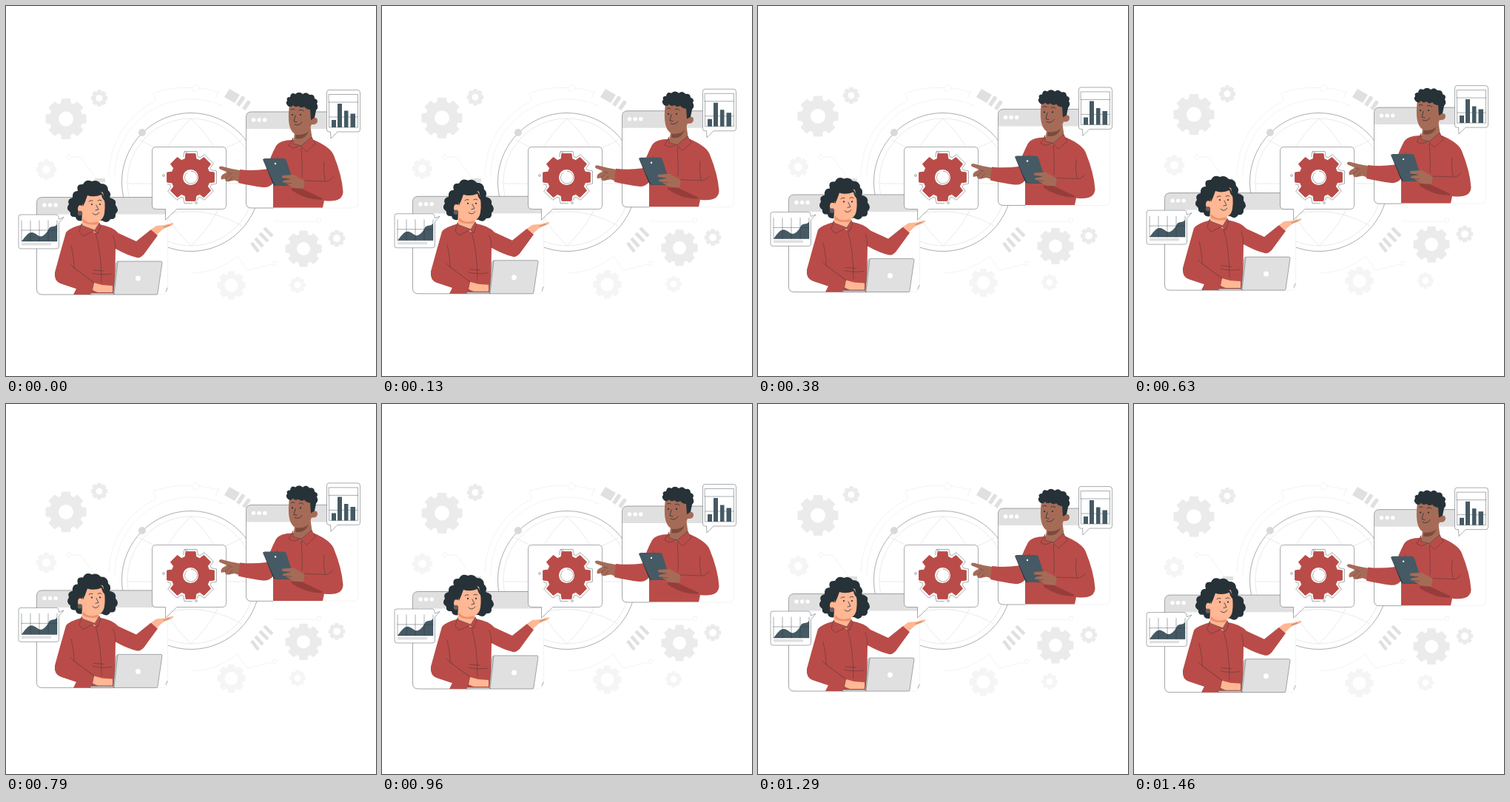
Write an HTML page that moves like this. It is 500 by 500 pixels and loops after 1.5 s.

```html
<!DOCTYPE html>
<html lang="en">
<head>
<meta charset="utf-8">
<title>Team presentation</title>
<style>
  html, body { margin: 0; width: 100%; height: 100%; overflow: hidden; background: #fff; }
  svg { display: block; width: 100vw; height: 100vh; }
  .dark { stroke: #263238; stroke-width: .4; }
  .faint { stroke: #ebebeb; stroke-width: .6; fill: none; }
  .line { fill: none; stroke: #263238; stroke-width: .4; stroke-linecap: round; stroke-linejoin: round; }
  .white { fill: #fff; }
  .gray { fill: #e0e0e0; }
  .ink { fill: #263238; }
  .slate { fill: #455a64; }
  .shirt { fill: #b94c48; }
  .fair { fill: #ffb794; }
  .brown { fill: #a66b57; }
  .face { stroke-width: .8; }
</style>
</head>
<body>
<svg viewBox="0 0 500 500">
  <g class="float" id="gears"></g>

  <g id="globe">
    <g class="faint">
      <path d="M139 228A112 112 0 0 1 203 128L199 118A128 128 0 0 1 251 110.500M260 111Q275 112 288 117M147 232A103 103 0 0 1 205 136Q250 116 293 135M252 361Q285 360 313 338L326 357L360 349M88 204H101L123 235M362 291H419M288 113L283 125"/>
      <circle cx="256" cy="111" r="4.500"/>
      <circle cx="84.500" cy="204" r="3"/>
      <circle cx="423" cy="290" r="3"/>
      <circle cx="363" cy="348" r="3"/>
      <path d="M164 240H336M181 181Q250 222 319 181M181 297Q250 258 319 297M250 152Q160 238 250 324Q340 238 250 152" stroke="#dcdcdc"/>
      <circle cx="250" cy="238" r="86" stroke="#dcdcdc"/>
    </g>
    <circle class="line" cx="250" cy="238" r="93.500"/>
    <circle cx="184" cy="171" r="5" fill="#d9d9d9"/>
    <path class="gray" d="M302 112L316 120L309 131L295 123ZM319 121L323.500 124L315.500 136L311 133ZM327 127L331 130L323.500 141L319 138ZM120 233H134V238.500H120Z"/>
    <path d="M349 300L360 311M343 307L354 318M337 314L347 325M332 320L341 332" fill="none" stroke="#e0e0e0" stroke-width="4.500"/>
  </g>

  <g class="float">
    <rect class="white" x="324.500" y="143" width="151.500" height="130" rx="7" stroke="#ebebeb" stroke-width=".6"/>
    <path class="gray" d="M325 166V150Q325 143 332 143H469Q476 143 476 150V166Z"/>
    <path class="line" d="M434 143H332Q324.500 143 324.500 150V266Q324.500 273 331 273H361"/>
    <rect class="white" x="41.500" y="258.500" width="177" height="131.500" rx="7" stroke="#ebebeb" stroke-width=".6"/>
    <path class="gray" d="M42 281.500V265Q42 258.500 49 258.500H212Q218 258.500 218 265V281.500Z"/>
    <path class="line" d="M198 258.500H49Q41.500 258.500 41.500 266V383Q41.500 390 49 390H116M216 386L218 381"/>
    <g class="white" id="dots"></g>
  </g>

  <g id="bubble">
    <path class="white dark" d="M203 190.500H292Q297.500 190.500 297.500 196V269Q297.500 274.500 292 274.500H231L215.500 289V274.500H203Q197.500 274.500 197.500 269V196Q197.500 190.500 203 190.500Z"/>
  </g>

  <g class="float">
    <g id="areaCard">
      <path class="white dark" d="M20 282H68Q71 282 71.500 288L78 285.500L71.500 293V325Q71.500 328 68 328H20Q17 328 17 325V285Q17 282 20 282Z"/>
      <path class="slate" d="M21 318C26 312 30 305 36 306C43 308 45 315 52 309C59 303 56 299 63 298Q67 298 69 295V318Z"/>
      <path class="line" d="M21 290V318H69V290M33 290V318M45 290V318M57 290V318M21 303H69"/>
      <path class="gray" d="M21 320H61V323.500H21Z"/>
    </g>
    <g id="barCard">
      <path class="white dark" d="M436 113.500H475Q478.500 113.500 478.500 117V167Q478.500 170 475 170H448L439 179L438.500 170H436Q433.500 170 433.500 167V117Q433.500 113.500 436 113.500Z"/>
      <path class="line" d="M436.500 119.500H475.500V130H436.500ZM436.500 130V164H475.500V130M437 150H475"/>
      <path class="slate" d="M440 154H446V164H440ZM448 132H454V164H448ZM457 141.500H462.500V164H457ZM465.500 145.500H472V164H465.500Z"/>
    </g>

    <g id="man">
      <path class="brown" d="M316 222L305 220L291 216.500Q286 217 289 220.500L299 224.500L294 227Q289 230 291 234.500L296 233.500Q296 238 301 237L309 235.500L316 238Z"/>
      <path class="line" d="M299 224.500L305 227M296 233.500L302 228M301 237L306 231"/>
      <path class="shirt" d="M388 181Q370 181 365 189Q357 204 352 220.500Q333 223 316 221L314 239Q332 243 347 245Q356 246 361 239V272.500H428L430 263Q455 266 455.500 251Q454 229 443 202Q439 191 416 181Z"/>
      <path class="brown" d="M391 165L388 186L398 192Q409 188 414 181L411 160Z"/>
      <path d="M392 171Q400 177 409 169Q404 182 391 179Z" fill="#7b4b3d"/>
      <path class="shirt dark" d="M388 178L382 189L388 192L398 189L406 197L418 186L413 177L399 189L388 186Z"/>
      <path class="brown" d="M383 133Q380 157 385 167Q390 177 401 173Q410 169 413 160Q420 161 421 155.500Q421 149 414 152L412 130Z"/>
      <path class="ink" d="M381 135Q377 131 380 128Q378 123 384 123Q385 116 391 119Q396 114.500 401 119Q406 115 410 120Q417 119 417 125Q423 127 420 132Q423 137 419 141L417 151L412 154L411 140Q406 140 403 136Q399 139 395 135Q391 138 388 134Q385 138 381 135Z"/>
      <path class="line face" d="M385 140Q387 138 390 140M396 141Q400 139 402 142M391 148L389 156L393 157M390 160Q396 163 400 157"/>
      <g class="ink"><circle cx="387" cy="147" r="1.100"/><circle cx="398" cy="147" r="1.100"/></g>
      <path class="line" d="M399 191Q401 220 400 231M362 217Q365 209 367 204M430 211Q428 223 431 236M394 251Q411 255 429 249"/>
      <path d="M386 246L402 246L430 252L427 262Q405 262 386 249Z" fill="#963d3b"/>
      <path class="shirt" d="M404 236L430 237L443 233L455 251Q454 264 432 262L400 247Z"/>
      <path class="line" d="M404 236L430 237Q437 238 442 231M404 236L401 247"/>
      <path class="ink" d="M347 207L361 241Q362 243 365 243H389L376 207Z"/>
      <path class="slate" d="M350 206H375Q378 206 379 209L389 240Q390 243 386 243H366Q363 243 362 240L348 209Q347 206 350 206Z"/>
      <circle class="white" cx="364" cy="213" r="1.200"/>
      <path class="brown" d="M404 237L389 228L374 229Q371 231 375 233L384 234L375 236Q372 238 377 239L389 246L402 247Z"/>
      <path class="line" d="M375 233L384 234M377 239L386 240"/>
    </g>

    <g id="woman">
      <path class="ink" d="M97 250Q94 240 104 241Q108 233 116 237Q123 234 128 240Q138 240 138 249Q143 253 140 259Q150 261 148 269Q154 276 148 281Q149 289 141 288Q137 295 130 290H104Q95 292 94 285Q86 286 87 279Q80 274 85 268Q82 261 90 259Q89 250 97 250Z"/>
      <path class="shirt" d="M104 295Q85 300 81 306Q73 334 66 360Q65 372 74 375L95 382L91 390H147L148 328Q164 337 177 340Q181 341 186 336L205 310L196 302L176 318L152 307Q144 298 126 295Z"/>
      <path class="fair" d="M103 280L102 297L121 307L127 296L124 282Z"/>
      <path d="M104 287Q113 297 125 290L124 295Q111 297 104 292Z" fill="#f0916f"/>
      <path class="shirt dark" d="M102 294L99 305L104 311L119 304L124 308L128 297L126 293L120 303L104 297Z"/>
      <path class="fair" d="M107 255Q104 263 103 270Q97 267 97 275Q98 281 104 281Q108 291 119 292Q131 292 133 280Q135 267 131 252Q119 247 107 255Z"/>
      <path class="ink" d="M103 264Q104 249 118 247Q131 247 134 264Q130 261 129 255Q119 259 110 256Q107 265 104 271Z"/>
      <path class="line face" d="M112 264Q114 262 117 263M124 263Q127 261 129 263M122 269L125 275L121 276M117 280Q121 285 126 279"/>
      <g class="ink"><circle cx="116" cy="268" r="1.100"/><circle cx="127" cy="268" r="1.100"/></g>
      <circle cx="100" cy="280" r="3.200" fill="#655d60"/>
      <path class="line" d="M121 307Q129 332 129 373M88 324Q92 340 92 354Q105 365 119 374M148 328Q148 318 145 311M118 357L132 358M117 361Q126 364 143 362M92 354L87 349"/>
      <path class="fair" d="M196 302L203 297L214 296L226 293Q227 295 223 297L213 301Q209 304 204 309Z"/>
      <path class="line" d="M213 299L221 296"/>
      <path class="shirt" d="M66 360L92 354L119 374L117 386L95 382L74 375Q65 372 66 360Z"/>
      <path class="line" d="M92 354L119 374L117 386"/>
      <path class="fair" d="M119 374L130 377L144 378V387L124 387L117 384Z"/>
      <path class="gray dark" d="M114 388H146V390H114Z"/>
      <path class="gray dark" d="M152 345H209Q211 345 211 347L205 388Q205 390 203 390H147Q145 390 145 388L149 347Q150 345 152 345Z"/>
      <path class="line" d="M151 346L146 389"/>
      <circle class="white" cx="178.500" cy="368" r="3.500"/>
    </g>
  </g>
</svg>
<script>
  const $ = id => document.getElementById(id);
  const add = (parent, markup) => parent.insertAdjacentHTML('beforeend', markup);

  // Eight-toothed outline; tip and base are half-widths of a tooth in radians.
  function gearPath(cx, cy, r, tip = .2, base = .29, root = .8) {
    const points = [];
    for (let tooth = 0; tooth < 8; tooth++) {
      for (const [offset, k] of [[-base, root], [-tip, 1], [tip, 1], [base, root]]) {
        const a = tooth * Math.PI / 4 + offset;
        points.push((cx + r * k * Math.sin(a)).toFixed(2) + ' ' + (cy - r * k * Math.cos(a)).toFixed(2));
      }
    }
    return 'M' + points.join('L') + 'Z';
  }

  function addGear(parent, x, y, r, hole, color) {
    add(parent, `<path d="${gearPath(x, y, r)}" fill="${color}" stroke="${color}" stroke-linejoin="round"/>
      <circle class="white" cx="${x}" cy="${y}" r="${hole}"/>`);
  }

  for (const [x, y, r, hole, color] of [
    [81, 152.5, 27.5, 10, '#ebebeb'], [126, 124.5, 11, 4.5, '#ebebeb'],
    [402, 328, 24.5, 9, '#ebebeb'], [447, 314, 11, 5, '#ebebeb'],
    [54.5, 221, 13.5, 5.5, '#f5f5f5'], [304.5, 377.5, 19, 9, '#f5f5f5'],
    [394, 377, 10.5, 4.5, '#f5f5f5']
  ]) addGear($('gears'), x, y, r, hole, color);

  for (const [x, y] of [[334.5, 154], [52, 269]])
    for (let i = 0; i < 3; i++) add($('dots'), `<circle cx="${x + i * 7.6}" cy="${y}" r="2.7"/>`);

  const bubble = $('bubble');
  addGear(bubble, 249.5, 231.5, 32.5, 10.5, '#b94c48');
  add(bubble, `<circle class="line" cx="250" cy="231.500" r="8.500" stroke-dasharray="34 6"/>
    <path class="line" d="${gearPath(249.5, 231.5, 36, .24, .34, .82)}" pathLength="8" stroke-dasharray="4.1 .3 1.7 1.900"/>`);
  for (const [x, y] of [[243.5, 197.5], [257, 266], [213, 229]])
    add(bubble, `<circle class="white dark" cx="${x}" cy="${y}" r="1.400"/>`);

  const floating = document.querySelectorAll('.float');
  const LOOP = 1500, RISE = 7;

  function draw() {
    const phase = performance.now() % LOOP / LOOP;
    const y = -RISE * (1 - Math.abs(1 - 2 * phase));
    for (const group of floating) group.setAttribute('transform', `translate(0 ${y.toFixed(3)})`);
    requestAnimationFrame(draw);
  }
  draw();
</script>
</body>
</html>
```
